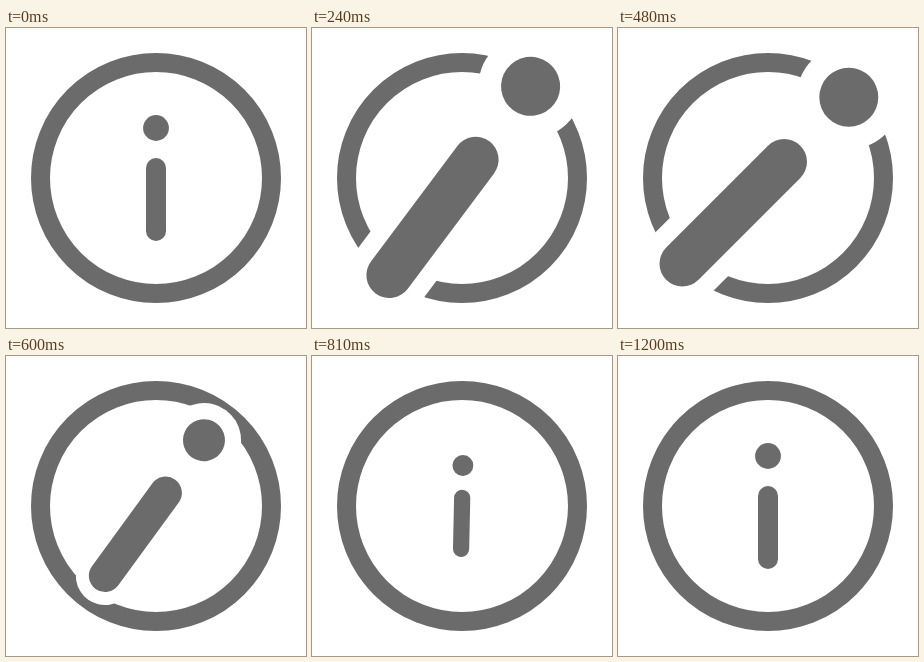
These frames come from a looping animation (300x300 px, 3230 ms). An HTML page:

```html
<!DOCTYPE html>
<html lang="en">
<head>
<meta charset="utf-8">
<title>Info icon</title>
<style>
  html, body { margin: 0; width: 100%; height: 100%; overflow: hidden; background: #fff; }
  svg { display: block; width: 100vw; height: 100vh; }
</style>
</head>
<body>
<svg viewBox="0 0 300 300">
  <circle cx="150" cy="150" r="115.5" fill="none" stroke="#6b6b6b" stroke-width="19"/>
  <g id="letter" stroke-linecap="round">
    <!-- white halos cut the ring -->
    <circle cy="-50" r="22.8" fill="#fff"/>
    <path d="M0-10V53" stroke="#fff" stroke-width="36"/>
    <circle cy="-50" r="12.9" fill="#6b6b6b"/>
    <path d="M0-10V53" stroke="#6b6b6b" stroke-width="20"/>
  </g>
</svg>
<script>
  const LOOP = 3230, STEP = 30, LAST = 40;
  const letter = document.getElementById('letter');

  // keys: [step, value]
  const ANGLE = [[0.25, 0], [10.9, 45], [16, 45], [32, -12], [40, 0]];
  const SCALE = [[0, 1], [8, 2.29], [15.7, 2.29], [25, 0.8], [40, 1]];

  const smooth = p => p * p * (3 - 2 * p);

  function valueAt(keys, step) {
    if (step <= keys[0][0]) return keys[0][1];
    for (let i = 1; i < keys.length; i++) {
      const [a, from] = keys[i - 1], [b, to] = keys[i];
      if (step <= b) return from + (to - from) * smooth((step - a) / (b - a));
    }
    return keys[keys.length - 1][1];
  }

  function draw(ms) {
    const step = Math.min(LAST, Math.floor((ms % LOOP) / STEP));
    const angle = valueAt(ANGLE, step), scale = valueAt(SCALE, step);
    letter.setAttribute('transform', `translate(150 150) rotate(${angle}) scale(${scale})`);
  }

  const start = performance.now();
  function tick() {
    draw(performance.now() - start);
    requestAnimationFrame(tick);
  }
  tick();
</script>
</body>
</html>
```
